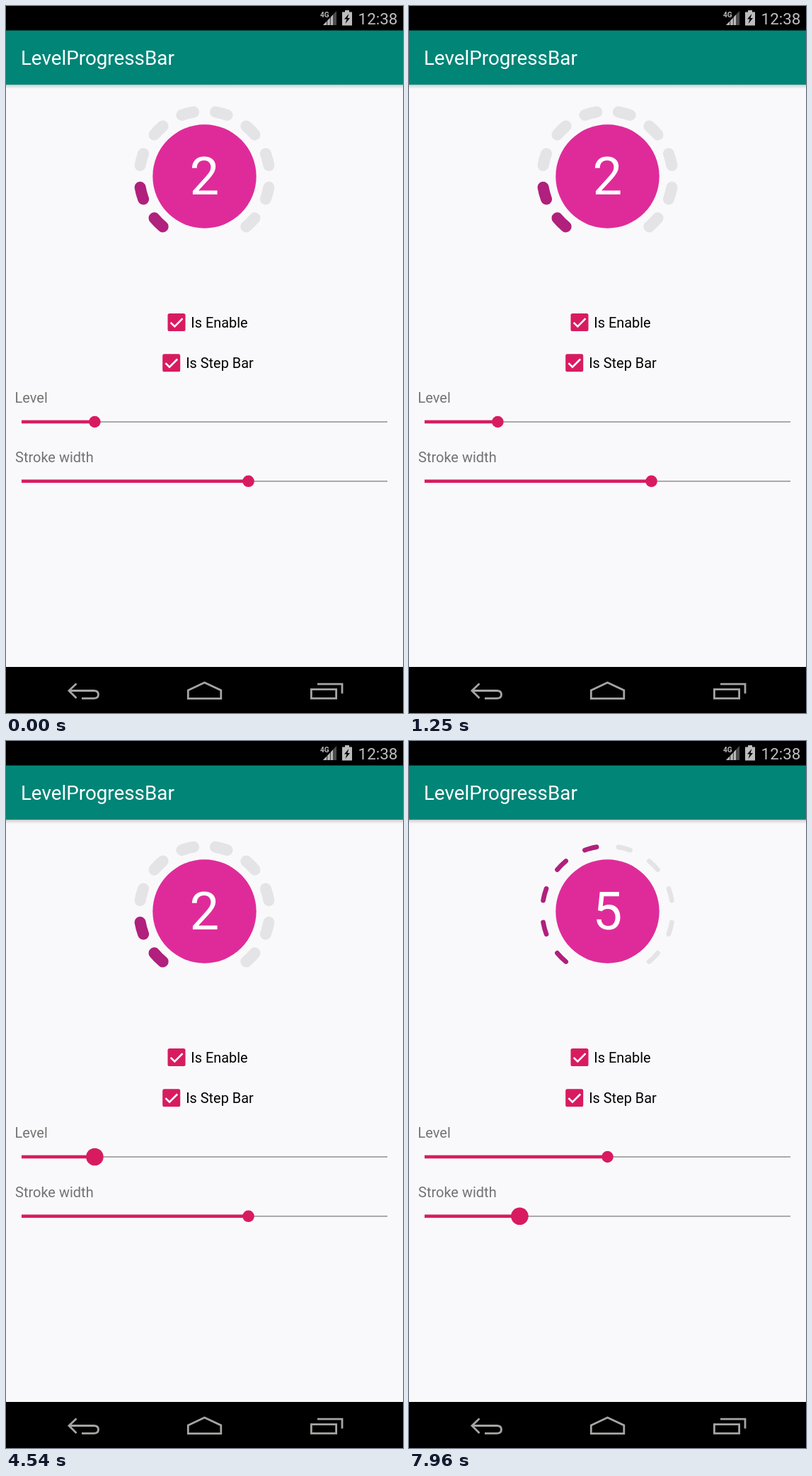
Animation, 561 px wide and 998 px high, one loop 8000 ms. Source, as an HTML page:

```html
<!DOCTYPE html>
<html lang="en">
<head>
<meta charset="utf-8">
<title>LevelProgressBar</title>
<style>
  html, body { margin: 0; width: 100%; height: 100%; overflow: hidden; background: #f9f9fb; }
  svg { display: block; width: 100vw; height: 100vh; font-family: Roboto, sans-serif; }
  .accent { fill: #d81b60; }
  .label { font-size: 20px; fill: #737373; }
  .option { font-size: 19.9px; fill: #000; }
  .check { fill: none; stroke: #fff; stroke-width: 2.6; }
  .nav { fill: none; stroke: #a6a5a3; stroke-width: 2.8; }
</style>
</head>
<body>
<svg viewBox="0 0 561 998">
  <defs>
    <linearGradient id="shade" x1="0" y1="0" x2="0" y2="1">
      <stop offset="0" stop-color="#000" stop-opacity=".34"/>
      <stop offset=".35" stop-color="#000" stop-opacity=".13"/>
      <stop offset="1" stop-color="#000" stop-opacity="0"/>
    </linearGradient>
    <g id="box">
      <rect class="accent" width="25" height="25" rx="2.6"/>
      <path class="check" d="M4.2 12.8 L9.8 18.4 L21 7.2"/>
    </g>
  </defs>

  <rect width="561" height="998" fill="#f9f9fb"/>
  <rect y="110" width="561" height="7" fill="url(#shade)"/>
  <rect y="34" width="561" height="77" fill="#008577"/>
  <text x="20.9" y="83" font-size="27.8" fill="#fff">LevelProgressBar</text>

  <rect width="561" height="34.5"/>
  <text x="444" y="15.6" font-size="10" font-weight="700" fill="#b9b9b9">4G</text>
  <path d="M467 7 V27 H448 Z" fill="#4b4b4b"/>
  <path d="M448 27 L453 21.7 V27 Z M454.3 20.4 L457.8 16.7 V27 H454.3 Z M459 15.4 L462 12.2 V27 H459 Z" fill="#b9b9b9"/>
  <path d="M479 6 H485 V8.5 H489 V27.5 H475 V8.5 H479 Z" fill="#bdbdbd"/>
  <path d="M484.5 11 L478 18.5 H481.5 L479.5 25 L486 17 H482.5 Z"/>
  <text x="497.6" y="26" font-size="22.4" fill="#bdbdbd">12:38</text>

  <g id="dashes" stroke-linecap="round"></g>
  <circle cx="280.5" cy="240.5" r="73.2" fill="#df2b9a"/>
  <text id="count" x="280.5" y="266" font-size="74.5" text-anchor="middle" fill="#fff"></text>

  <use href="#box" x="228.5" y="434"/>
  <text class="option" x="261.3" y="454">Is Enable</text>
  <use href="#box" x="221.2" y="491.3"/>
  <text class="option" x="254.2" y="511">Is Step Bar</text>
  <text class="label" x="12.5" y="560">Level</text>
  <text class="label" x="13" y="643.5">Stroke width</text>
  <g id="bars"></g>

  <rect y="933" width="561" height="65"/>
  <g class="nav">
    <path d="M99.5 956.5 L89 966.5 L99.5 977 M89 966.5 H124 Q130.5 966.5 130.5 972 Q130.5 977.3 124 977.3 H107"/>
    <path d="M257.3 966 L280.5 955 L303.8 966 V977.6 H257.3 Z"/>
    <path d="M431.4 964.6 H466.6 V977.3 H431.4 Z M440 957.2 H475 V970.5"/>
  </g>
</svg>
<script>
const LOOP = 8000, LEFT = 22, SPAN = 517, SVG = 'http://www.w3.org/2000/svg';
const $ = id => document.getElementById(id);
const clamp = x => Math.min(1, Math.max(0, x));
const ease = x => x * x * (3 - 2 * x);

function add(parent, tag, attrs) {
  const el = document.createElementNS(SVG, tag);
  set(el, attrs);
  return parent.appendChild(el);
}
function set(el, attrs) {
  for (const k in attrs) el.setAttribute(k, attrs[k]);
}

const dashes = Array.from({ length: 10 }, (_, i) => add($('dashes'), 'path', {
  d: 'M-8.6 -91.8 Q0 -92.6 8.6 -91.8',
  fill: 'none',
  transform: `translate(280.5 240.5) rotate(${225 + 30 * i})`
}));

function slider(y) {
  add($('bars'), 'rect', { x: LEFT, y: y - 0.6, width: SPAN, height: 1.3, fill: '#808080' });
  const fill = add($('bars'), 'rect', { class: 'accent', x: LEFT, y: y - 2.3, height: 4.6 });
  const thumb = add($('bars'), 'circle', { class: 'accent', cy: y });
  return (ratio, press) => {
    set(fill, { width: SPAN * ratio });
    set(thumb, { cx: LEFT + SPAN * ratio, r: 8.3 + 4 * press });
  };
}
const levelBar = slider(587), strokeBar = slider(670.8);

// 0..1 while a finger is down between two times
const held = (t, down, up) => ease(clamp((t - down) / 120)) - ease(clamp((t - up) / 120));

const levelSteps = [5150, 5650, 6200];

function draw(t) {
  const level = 2 + levelSteps.filter(s => t >= s).length;
  const stroke = Math.round(31 - 18 * clamp((t - 7380) / 560)) / 50;

  dashes.forEach((d, i) => set(d, {
    stroke: i < level ? '#b0207c' : '#e4e4e6',
    'stroke-width': 25.8 * stroke
  }));
  $('count').textContent = level;
  levelBar(level / 10, held(t, 4270, 6980));
  strokeBar(stroke, held(t, 7260, LOOP));
}

const start = performance.now();
function tick() {
  draw((performance.now() - start) % LOOP);
  requestAnimationFrame(tick);
}
tick();
</script>
</body>
</html>
```
